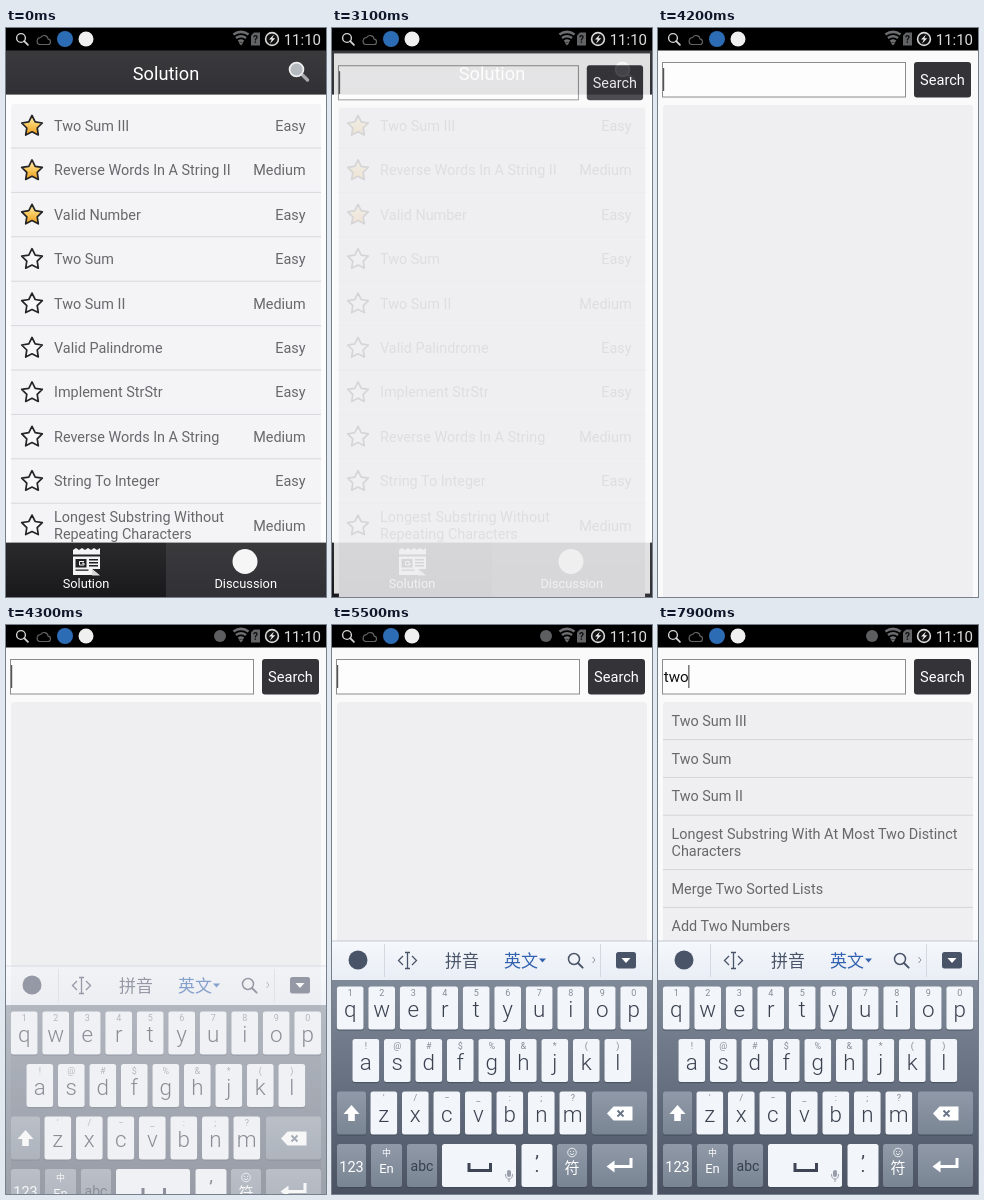
Animation of 320 by 569 pixels, one loop 8 s. Source, as an HTML page:

```html
<!DOCTYPE html>
<html lang="en">
<head>
<meta charset="utf-8">
<title>Problem search</title>
<style>
  html, body { margin: 0; width: 100%; height: 100%; overflow: hidden; background: #fff; }
  svg { display: block; width: 100%; height: 100%; }
  text { font-family: Roboto, "Noto Sans CJK SC", "Noto Sans CJK", sans-serif; white-space: pre; }
</style>
</head>
<body>
<svg id="stage" viewBox="0 0 320 569" xmlns="http://www.w3.org/2000/svg"></svg>
<script>
const LOOP = 8000;
const INK = '#4a5468';
const BODY = 14.42;

const rect = (x, y, w, h, fill, extra = '') =>
  `<rect x="${x}" y="${y}" width="${w}" height="${h}" fill="${fill}" ${extra}/>`;
const circle = (x, y, r, fill, extra = '') =>
  `<circle cx="${x}" cy="${y}" r="${r}" fill="${fill}" ${extra}/>`;
const path = (d, fill, extra = '') => `<path d="${d}" fill="${fill}" ${extra}/>`;
const line = (d, stroke, width = 1, extra = '') =>
  path(d, 'none', `stroke="${stroke}" stroke-width="${width}" ${extra}`);
const text = (s, x, y, size, fill, anchor = 'start', extra = '') =>
  `<text x="${x}" y="${y}" font-size="${size}" fill="${fill}" text-anchor="${anchor}" ${extra}>${s}</text>`;
const group = (id, body, extra = '') => `<g id="${id}" ${extra}>${body}</g>`;
const gradient = (id, ...colors) =>
  `<linearGradient id="${id}" x2="0" y2="1">${colors.map((c, i) =>
    `<stop offset="${i / (colors.length - 1)}" stop-color="${c}"/>`).join('')}</linearGradient>`;

function lens(x, y, r, color, width) {
  const k = r * 0.72;
  return circle(x, y, r, 'none', `stroke="${color}" stroke-width="${width}"`) +
    line(`M${x + k} ${y + k}l${r * 0.85} ${r * 0.85}`, color, width * 1.3, 'stroke-linecap="round"');
}

function star(x, y, filled) {
  const points = Array.from({ length: 10 }, (_, i) => {
    const r = i % 2 ? 5.5 : 10.8;
    const a = i * Math.PI / 5 - Math.PI / 2;
    return `${(x + r * Math.cos(a)).toFixed(1)},${(y + 0.3 + r * Math.sin(a)).toFixed(1)}`;
  });
  return `<polygon points="${points.join(' ')}" fill="${filled ? 'url(#gold)' : '#f8f7fa'}"
    stroke="#252528" stroke-width="1.7" stroke-linejoin="round"/>`;
}

function statusBar() {
  const arcs = [3.5, 7, 10.5].map(r =>
    line(`M${235 - r * 0.72} ${17 - r}Q235 ${17 - r * 1.5} ${235 + r * 0.72} ${17 - r}`, '#6c6e70', 2.6)).join('');
  return rect(0, 0, 320, 22.5, '#000') +
    lens(15, 10, 4.4, '#d5d5d5', 1.4) +
    line('M33.5 16.5h8a2.7 2.7 0 0 0 .6-5.4a4 4 0 0 0-7.4-1.6a3.6 3.6 0 0 0-1.2 7z', '#626466', 1.1) +
    circle(59, 11, 8, '#2c6cb4') +
    circle(80, 11, 7.5, '#f0f0f0') +
    group('imeBadge', circle(214, 11, 6, '#5c5e60')) +
    arcs + path('M232.5 14.5h5l-2.5 3z', '#6c6e70') +
    path('M248 4.5h6v13h-9v-10z', '#626466') +
    text('?', 249.6, 15.2, 10, '#111', 'middle', 'font-weight="700"') +
    circle(266, 11, 6.4, '#111', 'stroke="#d9d9d9" stroke-width="1.6"') +
    path('M268 6.4l-5 5.2h2.8l-1.9 4.2l5.3-5.6h-2.9z', '#f2f2f2') +
    text('11:10', 315, 16.6, 15, '#dcdcdc', 'end');
}

const problems = [
  ['Two Sum III', 0, 1], ['Reverse Words In A String II', 1, 1], ['Valid Number', 0, 1],
  ['Two Sum', 0], ['Two Sum II', 1], ['Valid Palindrome', 0], ['Implement StrStr', 0],
  ['Reverse Words In A String', 1], ['String To Integer', 0],
  ['Longest Substring Without|Repeating Characters', 1]
];

function label(s, x, center) {
  const lines = s.split('|');
  return lines.map((part, i) =>
    text(part, x, center + 5 + (i - (lines.length - 1) / 2) * 16.6, BODY, '#68686b')).join('');
}

function newspaper() {
  const dark = '#222124';
  let s = path('M67 522l3-2l3 2l3-2l3 2l3-2l3 2l3-2l3 2l3-2v27h-6l-5 0h-16z', '#f4f4f4') +
    rect(67, 526.5, 27, 2, dark) + rect(69.5, 531, 11, 8.5, dark) +
    line('M78 533.5h-4.5v3.5h4.5v-1.8h-2', '#f4f4f4');
  for (const y of [531, 534, 537]) s += rect(83, y, 9, 1.5, dark);
  return s + rect(69.5, 541.5, 13, 1.3, dark) + path('M86 541h8v6.5z', dark) +
    path('M86 541v6.5h8z', '#d8d8d8');
}

function solutionScreen() {
  let rows = '';
  problems.forEach(([name, level, starred], i) => {
    const y = 98 + 44.4 * i;
    rows += star(26, y, starred) + label(name, 48, y) +
      text(level ? 'Medium' : 'Easy', 299.6, y + 5, BODY, '#68686b', 'end') +
      rect(5, (y + 21.5).toFixed(1), 310, 1, '#d9d8db');
  });
  return rect(0, 22, 320, 547, '#fdfdfd') +
    rect(5, 76, 310, 450, '#f4f3f6', 'rx="3"') + rows +
    rect(0, 22, 320, 44.6, 'url(#header)') +
    text('Solution', 160, 51.7, 18.2, '#fff', 'middle') +
    line('M296.5 47l5 5', '#a9aaad', 3.4, 'stroke-linecap="round"') +
    circle(290.5, 41.5, 6.9, '#b4bac0', 'stroke="#ededee" stroke-width="1.8"') +
    rect(0, 514.6, 160, 54.4, 'url(#tabOn)') + rect(160, 514.6, 160, 54.4, 'url(#header)') +
    newspaper() + circle(239, 533.5, 12.5, '#f6f6f6') +
    text('Solution', 80, 560, 12.8, '#fff', 'middle') +
    text('Discussion', 239.7, 560, 12.8, '#fff', 'middle');
}

function results(names) {
  let y = 76.8, s = '';
  for (const name of names) {
    const h = name.includes('|') ? 54.4 : 37.8;
    s += label(name, 13.5, y + h / 2) + rect(5, (y + h - 0.5).toFixed(1), 310, 1, '#d5d4d7');
    y += h;
  }
  return s;
}

function searchScreen() {
  return rect(0, 22, 320, 547, '#fafafb') +
    rect(5, 77, 310, 500, '#efeef0', 'rx="3"') +
    group('hitsT', results(['Two Sum III', 'Reverse Words In A String II', 'Two Sum', 'Two Sum II',
      'Implement StrStr', 'Reverse Words In A String'])) +
    group('hitsTwo', results(['Two Sum III', 'Two Sum', 'Two Sum II',
      'Longest Substring With At Most Two Distinct|Characters', 'Merge Two Sorted Lists', 'Add Two Numbers'])) +
    rect(4.5, 34.5, 243, 34.5, '#fefdfe', 'stroke="#8c8c8f"') +
    text('', 5.7, 57, 15.2, '#111', 'start', 'id="query"') +
    rect(5, 40, 1.2, 23, '#555', 'id="caret"') +
    rect(256, 34, 57, 35.5, '#343338', 'rx="3"') +
    text('Search', 284.5, 57, 14.6, '#fff', 'middle');
}

function key(x, y, w, dark, id = '') {
  return rect(x, y + 1.2, w, 43, '#3a4250', 'rx="2.5" opacity=".55"') +
    rect(x, y, w, 43, dark ? 'url(#darkKey)' : '#f2f5f9', `rx="2.5" ${id && `id="${id}"`}`);
}

function letterRow(letters, hints, x0, y) {
  return [...letters].map((c, i) => {
    const x = x0 + 31.5 * i;
    return key(x - 13.3, y, 26.6, false, 'key_' + c) +
      text(hints[i], x, y + 9.5, 9, '#858c98', 'middle') +
      text(c, x, y + 30.5, 22.4, '#3a4150', 'middle', 'font-weight="300"');
  }).join('');
}

function keyboard() {
  const toolbar = rect(0, 316, 320, 39, 'url(#tools)') + rect(0, 315.5, 320, 1, '#c3cad4') +
    rect(52, 319, 1, 33, '#d3d9e1') + rect(268, 319, 1, 33, '#d3d9e1') +
    circle(26, 335, 9.5, INK) +
    line('M71 331l-4.5 4.5l4.5 4.5M80 331l4.5 4.5l-4.5 4.5M75.5 328v15M73 327.5h5M73 343.5h5', INK, 1.3) +
    text('拼音', 130, 341.5, 17, INK, 'middle') +
    text('英文', 189, 341.5, 17, '#3262b0', 'middle') +
    path('M207 333.5h7l-3.5 4z', '#3262b0') +
    lens(242, 334, 5.5, INK, 1.5) +
    line('M260.5 332l2.5 3l-2.5 3', '#8a93a2') +
    rect(284, 327, 20, 16.5, INK, 'rx="2.5"') + path('M289.5 333h9l-4.5 5z', '#fff');
  const white = (s, x, y, size) => text(s, x, y, size, '#fff', 'middle');
  const row3 = key(5, 466.5, 29, true) +
    path('M19.5 480l-8 9h4.7v7h6.6v-7h4.7z', '#fff') +
    letterRow('zxcvbnm', ["'", '/', '−', '_', ':', ';', '?'], 51.8, 466.5) +
    key(260, 466.5, 55, true) +
    path('M275 488.5l6.5-7h19v14h-19z', '#fff') +
    line('M285.5 485.5l6 6m0-6l-6 6', '#687386', 1.8);
  const row4 = key(5, 519, 29, true) + white('123', 19.5, 546.5, 14.5) +
    key(39, 519, 31, true) + white('中', 54.5, 531, 9) + white('En', 54.5, 547.5, 13) +
    key(75, 519, 30, true) + text('abc', 90, 546, 14, '#384050', 'middle') +
    key(110, 519, 74, false) + line('M137 538v7.5h21.5v-7.5', '#3e4554', 3) +
    rect(175, 545, 4, 7, '#989faa', 'rx="2"') + line('M173.5 549q0 5 3.5 5t3.5-5M177 554v3', '#989faa') +
    key(189.5, 519, 31, false) + text(',', 205, 532, 19, '#3e4554', 'middle') +
    text('.', 205, 547, 19, '#3e4554', 'middle') +
    key(225, 519, 30, true) +
    circle(240, 527.5, 4.3, 'none', 'stroke="#fff" stroke-width=".8"') +
    line('M238 528.5q2 2.5 4 0M238.4 526v1M241.6 526v1', '#fff', 0.8) + white('符', 240, 548, 15) +
    key(260, 519, 55, true) +
    line('M299 533v8.5h-18', '#fff', 3) + path('M274.5 541.5l8-6v12z', '#fff');
  return rect(0, 355, 320, 214, 'url(#board)') + toolbar +
    letterRow('qwertyuiop', '1234567890', 18.2, 361.5) +
    letterRow('asdfghjkl', ['!', '@', '#', '$', '%', '&amp;', '*', '(', ')'], 33.8, 414) + row3 + row4;
}

const stage = document.getElementById('stage');
stage.innerHTML = `<defs>
  ${gradient('gold', '#fff0b8', '#f9c95c', '#ec9a1c')}
  ${gradient('header', '#3a393c', '#313034')}
  ${gradient('tabOn', '#2a292c', '#19191b')}
  ${gradient('tools', '#f5f8fc', '#e9eef5')}
  ${gradient('board', '#7f8998', '#656f7f', '#4b5363')}
  ${gradient('darkKey', '#8f99a7', '#7a8594')}
  </defs>` +
  group('solution', solutionScreen()) + group('search', searchScreen()) +
  group('keyboard', keyboard()) + statusBar();

const el = id => document.getElementById(id);
const show = (id, on) => el(id).setAttribute('visibility', on ? 'visible' : 'hidden');
const between = (t, a, b) => t >= a && t < b;

function render(t) {
  const step = Math.floor(t / 100) * 100;
  const p = Math.min(1, Math.max(0, (step - 2900) / 400));
  const eased = 1 - (1 - p) ** 3;
  const scale = 0.9 + 0.1 * eased;
  show('solution', p < 1);
  const search = el('search');
  search.setAttribute('opacity', eased);
  search.setAttribute('transform', `translate(160 295) scale(${scale}) translate(-160 -295)`);

  const query = t < 6200 ? '' : t < 6800 ? 't' : t < 6900 ? 'tw' : 'two';
  el('query').textContent = query;
  el('caret').setAttribute('x', query ? 5.2 + el('query').getComputedTextLength() : 5);
  const caretOff = [[3700, 4200], [4800, 5200], [5700, 6200], [7400, 7900]];
  el('caret').setAttribute('opacity', caretOff.some(([a, b]) => between(t, a, b)) ? 0 : 1);
  el('hitsT').setAttribute('display', between(t, 6400, 7200) ? 'inline' : 'none');
  el('hitsTwo').setAttribute('display', t >= 7200 ? 'inline' : 'none');

  const settled = t >= 4500;
  show('keyboard', t >= 4300);
  show('imeBadge', t >= 4300);
  el('keyboard').setAttribute('opacity', settled ? 1 : 0.55);
  el('keyboard').setAttribute('transform', `translate(0 ${settled ? 0 : 25})`);
  el('key_t').setAttribute('fill', between(t, 6000, 6200) ? '#bcc5d2' : '#f2f5f9');
}

const start = performance.now();
function tick(now) {
  render(Math.max(0, now - start) % LOOP);
  requestAnimationFrame(tick);
}
render(0);
requestAnimationFrame(tick);
</script>
</body>
</html>
```
